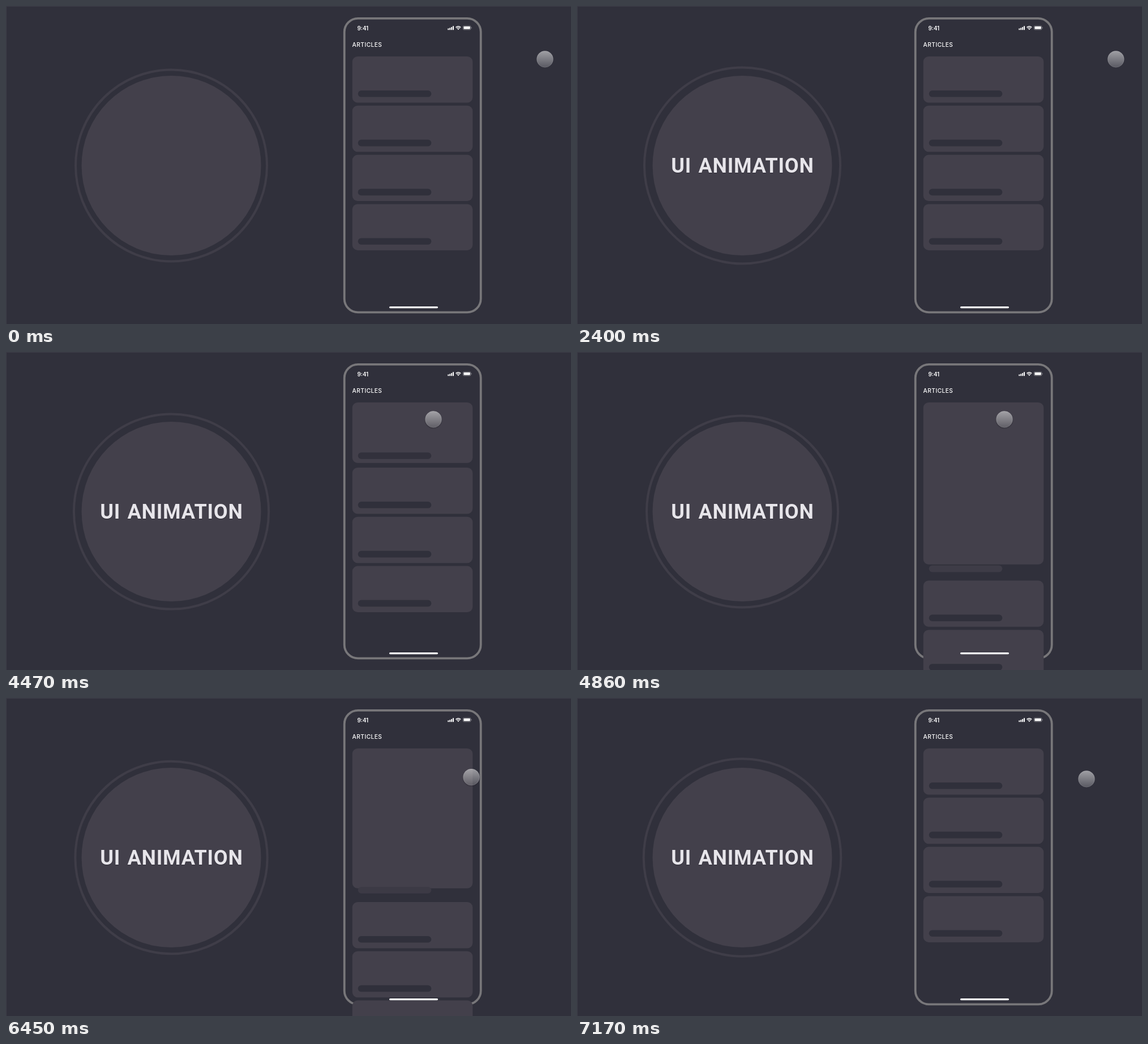
Recreate the animation shown at these times as an HTML page. Size 998x561 px, loop 7.2 s.

```html
<!DOCTYPE html>
<html lang="en">
<head>
<meta charset="utf-8">
<title>UI animation</title>
<style>
  html, body { margin: 0; width: 100%; height: 100%; overflow: hidden; background: #30303b; }
  svg { display: block; width: 998px; height: 561px; }
  text { fill: #fff; font-family: Inter, Roboto, sans-serif; }
  #title {
    fill: #e7e5ea; font: 700 36px Roboto, "Open Sans", sans-serif;
    letter-spacing: .75px; word-spacing: 3px; text-shadow: 0 1px 1px rgba(20, 18, 28, .4);
  }
</style>
</head>
<body>
<svg viewBox="0 0 998 561">
  <defs>
    <linearGradient id="glass" x1="0" y1="0" x2="0" y2="1">
      <stop offset="0" stop-color="#fff" stop-opacity=".54"/>
      <stop offset="1" stop-color="#fff" stop-opacity=".2"/>
    </linearGradient>
  </defs>
  <rect width="998" height="561" fill="#30303b"/>
  <path d="M.5 561V.5H998" fill="none" stroke="#3d3c47"/>

  <circle id="ring" cx="292" cy="281.5" r="169" fill="none" stroke="#3f3d48" stroke-width="4"/>
  <circle cx="292" cy="281.5" r="158.5" fill="#43404b"/>
  <text id="title" x="166.2" y="294">UI ANIMATION</text>

  <rect x="597.7" y="21.8" width="241" height="518.6" rx="24" fill="none" stroke="#78777a" stroke-width="3.8"/>
  <text x="620.5" y="43" font-size="9.8" font-weight="600">9:41</text>
  <g fill="#fff">
    <rect x="780.3" y="39.6" width="2" height="2.6" rx=".5"/>
    <rect x="783.2" y="38.4" width="2" height="3.8" rx=".5"/>
    <rect x="786.1" y="36.9" width="2" height="5.3" rx=".5"/>
    <rect x="789" y="35.3" width="2" height="6.9" rx=".5"/>
    <path d="M798.9 42.2l-1.6-1.8a2.3 2.3 0 0 1 3.2 0z"/>
    <rect x="808.4" y="36.1" width="11.4" height="4.7" rx="1"/>
    <rect x="821.5" y="37.3" width=".9" height="2.3" rx=".4" opacity=".5"/>
  </g>
  <path d="M794.5 37.8a6.3 6.3 0 0 1 8.8 0M796 39.5a4.2 4.2 0 0 1 5.8 0" fill="none" stroke="#fff" stroke-width="1.3"/>
  <rect x="807.2" y="34.9" width="13.8" height="7.1" rx="2" fill="none" stroke="#fff" stroke-opacity=".45" stroke-width=".7"/>
  <text x="611.6" y="72" font-size="10.2" font-weight="500" letter-spacing=".45">ARTICLES</text>

  <g id="cards"></g>
  <rect x="677" y="530" width="86" height="3.2" rx="1.6" fill="#fff"/>

  <g id="cursor">
    <circle id="shade" cy="1" r="15.4" fill="#1c1b24" opacity="0"/>
    <circle r="14.6" fill="url(#glass)"/>
    <circle r="14.3" fill="none" stroke="#fff" stroke-opacity=".16" stroke-width=".7"/>
  </g>
</svg>
<script>
const $ = id => document.getElementById(id);
const set = (el, attrs) => { for (const k in attrs) el.setAttribute(k, attrs[k]); };
const LOOP = 7200, CARD_H = 81.5, PITCH = 86.8, CARD_Y = 89;

function rect(parent, attrs) {
  const el = document.createElementNS('http://www.w3.org/2000/svg', 'rect');
  set(el, attrs);
  return parent.appendChild(el);
}

const cards = [0, 1, 2, 3].map(i => ({
  y: CARD_Y + i * PITCH,
  box: rect($('cards'), { x: 611.7, width: 212.6, height: CARD_H, rx: 9.5, fill: '#43404b' }),
  bar: rect($('cards'), { x: 621.7, width: 129.6, height: 11.6, rx: 5.8, fill: '#30303b' })
}));

const span = (t, from, to) => Math.min(1, Math.max(0, (t - from) / (to - from)));
const smooth = x => x * x * (3 - 2 * x);
const smoother = x => x * x * x * (x * (6 * x - 15) + 10);

// Timing curve with handles (a, 0) and (b, 1), solved by bisection
function bezier(x, a, b) {
  let lo = 0, hi = 1;
  for (let i = 0; i < 24; i++) {
    const u = (lo + hi) / 2, v = 1 - u;
    if (3 * v * v * u * a + 3 * v * u * u * b + u * u * u < x) lo = u; else hi = u;
  }
  return lo * lo * (3 - 2 * lo);
}

function ringGrowth(t) {
  const phase = Math.max(0, t - 545) / 715 % 2;
  return smoother(phase > 1 ? 2 - phase : phase);
}

function cursorAt(t) {
  if (t < 4600) {
    const q = bezier(span(t, 2360, 4300), .5, .4);
    return [952 - 197 * q, 93.8 + 25 * q ** 4.3];
  }
  const q = bezier(span(t, 5200, 7300), .75, .55);
  return [755 + 146 * q, 118.8 + 24 * (1 - (1 - q) ** 3.3)];
}

function draw(t) {
  set($('ring'), { r: 169 + 6 * ringGrowth(t) });

  const rest = (1 - span(t, 420, 1890)) ** 3;
  set($('title'), { opacity: 1 - rest, transform: `translate(0 ${-15 * rest})` });

  const open = smooth(span(t, 4320, 5120)) - smooth(span(t, 6110, 6910));
  const push = 302 * open;
  cards.forEach(({ y, box, bar }, i) => {
    set(box, i ? { y: y + push } : { y, height: CARD_H + 271 * open });
    set(bar, { y: y + 60 + push });
  });
  const mix = (a, b) => Math.round(a + (b - a) * open);
  set(cards[0].bar, { fill: `rgb(${mix(48, 67)},${mix(48, 64)},${mix(59, 75)})` });

  const [x, y] = cursorAt(t);
  set($('cursor'), { transform: `translate(${x} ${y})` });
  set($('shade'), { opacity: .28 * span(x, 860, 815) });
}

function tick(now) {
  draw(now % LOOP);
  requestAnimationFrame(tick);
}
draw(0);
requestAnimationFrame(tick);
</script>
</body>
</html>
```
